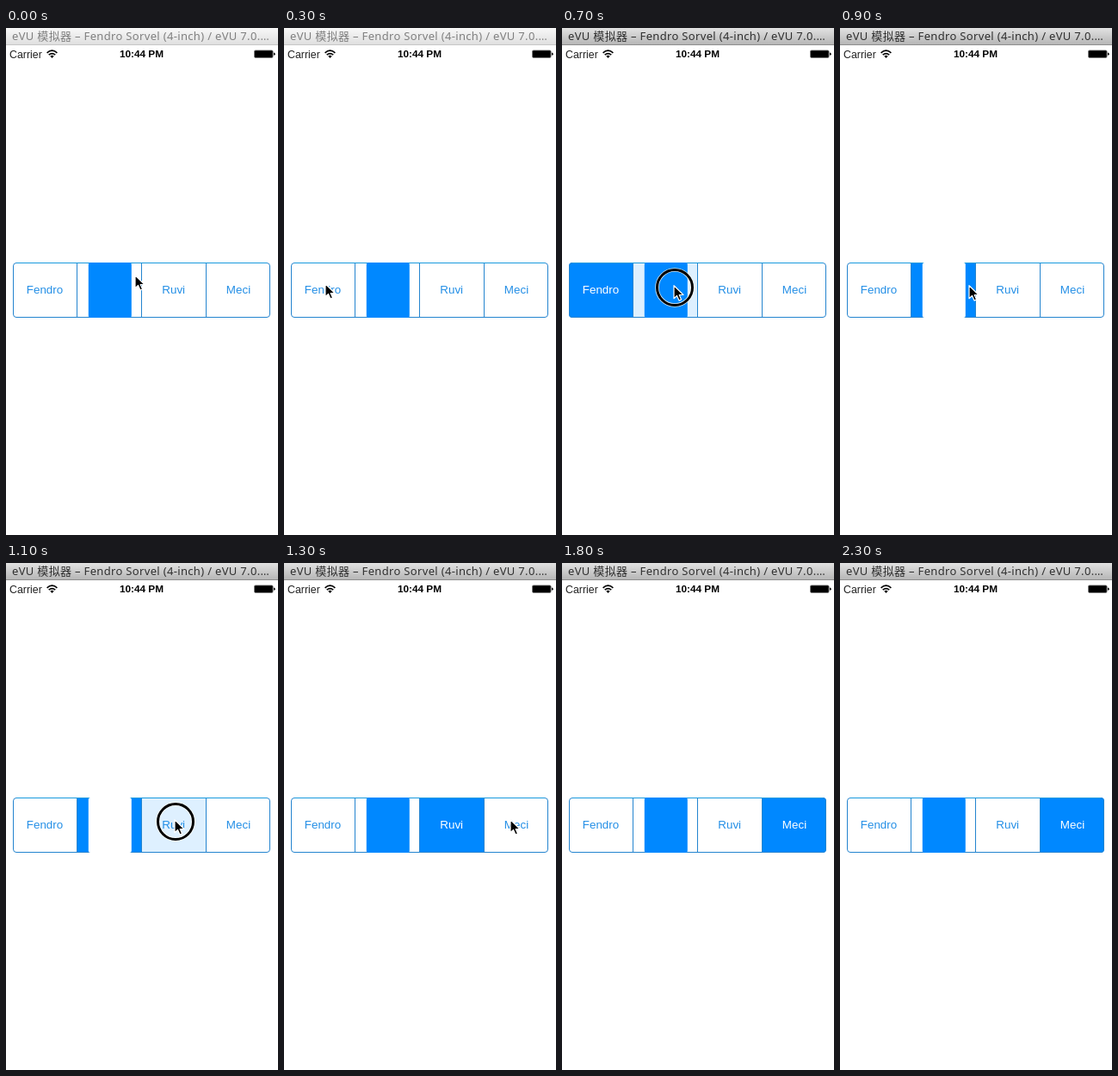
Write an HTML page that moves like this. It is 316 px wide and 588 px high and loops after 2.4 s.

```html
<!DOCTYPE html>
<html lang="zh">
<head>
<meta charset="utf-8">
<title>Segmented control</title>
<style>
  html, body { margin: 0; width: 100%; height: 100%; overflow: hidden; background: #fff; }
  svg { display: block; width: 316px; height: 588px; }
  text { font-family: "Liberation Sans", Arial, sans-serif; }
  #title { font: 13px "Noto Sans", "Noto Sans CJK SC", "Noto Sans CJK", sans-serif; letter-spacing: .33px; }
  .label { font-size: 13.4px; text-anchor: middle; }
</style>
</head>
<body>
<svg viewBox="0 0 316 588">
  <defs>
    <linearGradient id="idle" x2="0" y2="1">
      <stop stop-color="#f8f8f8"/><stop offset="1" stop-color="#dedede"/>
    </linearGradient>
    <linearGradient id="active" x2="0" y2="1">
      <stop stop-color="#e2e2e2"/><stop offset="1" stop-color="#b4b4b4"/>
    </linearGradient>
    <clipPath id="frame"><rect x="8" y="272" width="299" height="64" rx="4"/></clipPath>
  </defs>

  <rect id="bar" width="316" height="20"/>
  <rect id="edge" y="19" width="316" height="1"/>
  <text id="title" x="7" y="14">eVU 模拟器 – Fendro Sorvel (4-inch) / eVU 7.0.…</text>

  <text x="4" y="34.6" font-size="12.4" fill="#222">Carrier</text>
  <g fill="none" stroke="#000" stroke-width="1.6">
    <path d="M47.6 28.8Q53.5 23.6 59.4 28.8"/>
    <path d="M49.7 31.2Q53.5 27.9 57.3 31.2"/>
  </g>
  <path d="M51.3 32.6Q53.5 30.9 55.7 32.6L53.5 35Z"/>
  <text x="157.5" y="34.4" font-size="11.8" font-weight="bold" text-anchor="middle">10:44 PM</text>
  <rect x="288.5" y="25.9" width="21.6" height="8.6" rx="1.4" stroke="#777" stroke-width=".8"/>
  <path d="M311 28.6q1.7 .3 1.7 1.6t-1.7 1.6z"/>

  <g id="fills" clip-path="url(#frame)"></g>
  <g fill="none" stroke="#2484cf">
    <path d="M82.5 272V336M157.5 272V336M232.5 272V336"/>
    <rect x="8.5" y="272.5" width="298" height="63" rx="3.5"/>
    <path d="M12 272.5H303" stroke="#189ade"/>
  </g>
  <g id="labels"></g>

  <g id="ring" fill="none">
    <circle r="20.5" stroke="#fff" stroke-opacity=".8" stroke-width="4.6"/>
    <circle r="20.5" stroke="#000" stroke-width="3"/>
  </g>
  <path id="arrow" d="M0 0V15L3.5 11.8L6 17.4L8.6 16.2L6.2 10.8H11Z"
        stroke="#fff" stroke-width="1.2" stroke-linejoin="round"/>
</svg>

<script>
const LOOP = 2400, STEP = 100, GONE = 18;
const BLUE = [0, 136, 255], INK = [36, 143, 230], WHITE = [255, 255, 255];
const names = ["Fendro", null, "Ruvi", "Meci"];
const edges = [8, 82, 157, 232, 307];
const presses = [4, 7, 11, 14]; // step at which each segment is pressed
const path = [
  [150, 287], [112, 291], [66, 295], [48, 297], [48, 297],
  [52, 297], [100, 299], [130, 299], [131, 299], [150, 299],
  [188, 298], [196, 298], [200, 298], [263, 298], [265, 297]
];

const $ = id => document.getElementById(id);
const set = (el, attrs) => {
  for (const k in attrs) el.setAttribute(k, attrs[k]);
  return el;
};
const add = (parent, tag, attrs) =>
  $(parent).appendChild(set(document.createElementNS("http://www.w3.org/2000/svg", tag), attrs));
const mix = (a, b, k) => `rgb(${a.map((v, i) => Math.round(v + (b[i] - v) * k))})`;

const segments = names.map((name, i) => {
  const x = edges[i], end = edges[i + 1] + (i < 3 ? 1 : 0);
  const fill = add("fills", "rect", { x, y: 272, width: end - x, height: 64 });
  const mark = name
    ? add("labels", "text", { class: "label", x: [45, 0, 194.7, 270][i], y: 308 })
    : add("labels", "rect", { x: 95.8, y: 272, width: 50, height: 64, rx: 2.5 });
  if (name) mark.textContent = name;
  return { fill, mark, ink: name ? INK : BLUE };
});

// How far segment i is selected: fades in after its press, out after the next
function selected(i, step) {
  const since = step - presses[i];
  const next = i < 3 ? step - presses[i + 1] : -1;
  if (next > 1) return 0;
  if (next === 1) return 0.62;
  return since > 1 ? 1 : since === 1 ? 0.4 : 0;
}

function draw(step) {
  const on = step >= presses[0];
  set($("bar"), { fill: on ? "url(#active)" : "url(#idle)" });
  set($("edge"), { fill: on ? "#8e8e8e" : "#c6c6c6" });
  set($("title"), { fill: on ? "#303030" : "#808080" });

  segments.forEach(({ fill, mark, ink }, i) => {
    const k = selected(i, step);
    set(fill, { fill: mix(WHITE, BLUE, step === presses[i] ? 0.13 : k) });
    set(mark, { fill: mix(ink, WHITE, k) });
  });

  const [x, y] = path[Math.min(step, path.length - 1)];
  set($("arrow"), {
    transform: `translate(${x} ${y - 0.3})`,
    visibility: step < GONE ? "visible" : "hidden"
  });
  set($("ring"), {
    transform: `translate(${x + 1} ${y + 2})`,
    visibility: presses.includes(step) ? "visible" : "hidden"
  });
}

const start = performance.now();
function tick() {
  draw(Math.floor(((performance.now() - start) % LOOP) / STEP));
  requestAnimationFrame(tick);
}
tick();
</script>
</body>
</html>
```
